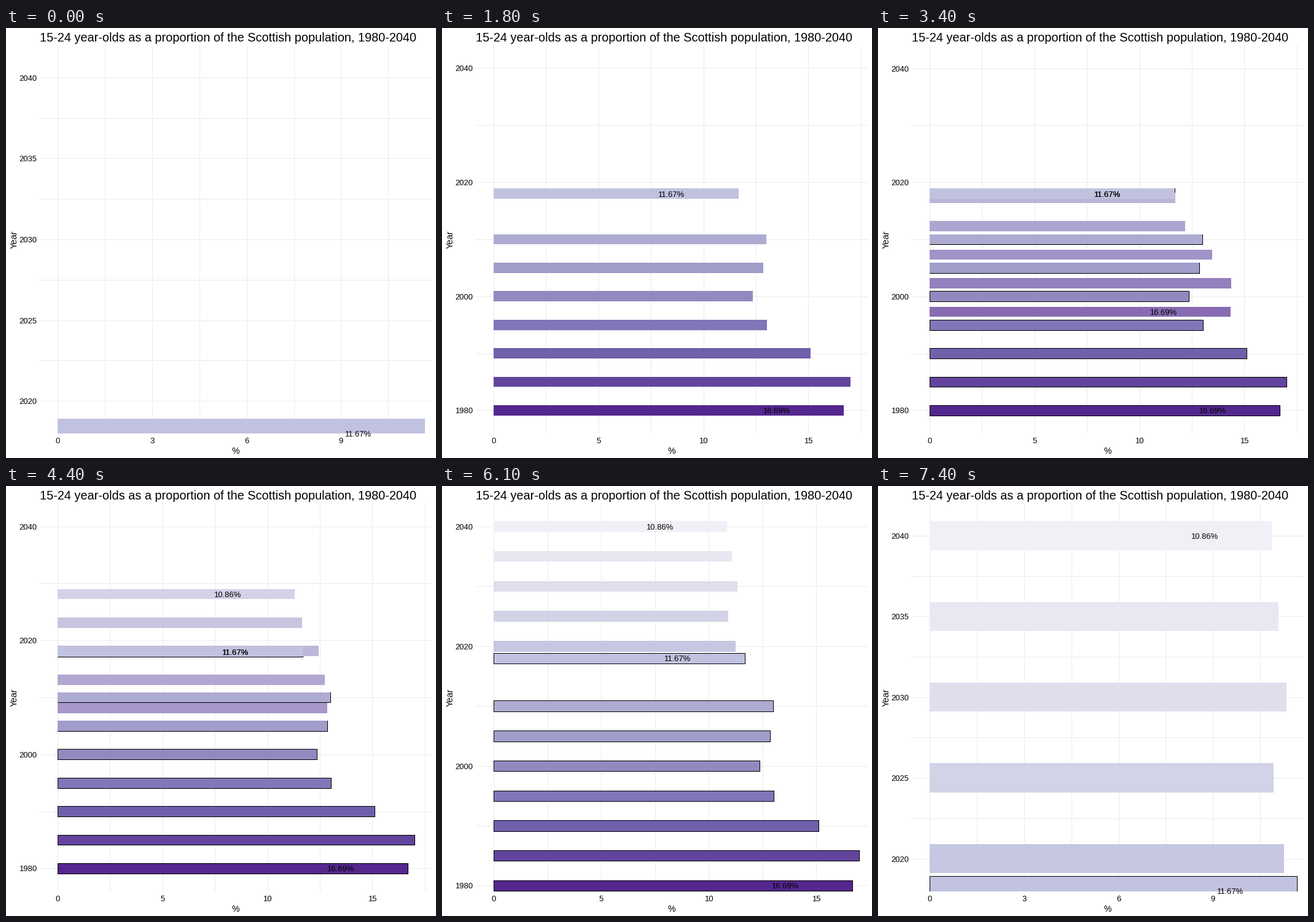
A matplotlib script that plays this animation: 700x700 px, repeating every 10 s.

```python
import math

import numpy as np
import matplotlib.pyplot as plt
from matplotlib.animation import FuncAnimation
from matplotlib.patches import Rectangle

plt.rcParams["font.family"] = "Liberation Sans"

SIZE, DPI = 700, 100
LEFT, RIGHT, TOP, BOTTOM = 55, 694, 28, 660
X_SPAN = (84.05, 664.95)      # pixels of the unexpanded x range
Y_SPAN = (630.8, 57.2)        # pixels of the unexpanded y range
PAD = 0.05
HALF = 0.9                    # half a bar, in years
LABEL_SHIFT = 110
GRID = "#EBEBEB"

FRAMES, LAST = 100, 74
MOVE_START, MOVE_END = 18, 55
ZOOM_START, ZOOM_LEN = 56, 19

PAST = [(1980, 16.69), (1985, 17.01), (1990, 15.11), (1995, 13.03),
        (2000, 12.36), (2005, 12.85), (2010, 13.0), (2018, 11.67)]
FUTURE = [(2020, 11.25), (2025, 10.92), (2030, 11.33), (2035, 11.08),
          (2040, 10.86)]
LABELS = {1980: "16.69%", 2018: "11.67%", 2040: "10.86%"}

# Views: x max, y min, y max
VIEW_PAST = np.array([17.01, 1979.1, 2018.9])
VIEW_ALL = np.array([17.01, 1979.1, 2040.9])
VIEW_FUTURE = np.array([11.33, 2019.1, 2040.9])

PURPLES = ["F2F0F7", "DADAEB", "BCBDDC", "9E9AC8", "756BB1", "54278F"]
TO_XYZ = np.array([[0.4124, 0.3576, 0.1805],
                   [0.2126, 0.7152, 0.0722],
                   [0.0193, 0.1192, 0.9505]])
WHITE = TO_XYZ.sum(axis=1)


def to_lab(code):
    rgb = np.array([int(code[i:i + 2], 16) for i in (0, 2, 4)]) / 255
    lin = np.where(rgb > 0.04045, ((rgb + 0.055) / 1.055) ** 2.4, rgb / 12.92)
    t = TO_XYZ @ lin / WHITE
    f = np.where(t > 0.008856, np.cbrt(t), 7.787 * t + 16 / 116)
    return np.array([116 * f[1] - 16, 500 * (f[0] - f[1]), 200 * (f[1] - f[2])])


def to_rgb(lab):
    fy = (lab[0] + 16) / 116
    f = np.array([fy + lab[1] / 500, fy, fy - lab[2] / 200])
    t = np.where(f > 0.2069, f ** 3, (f - 16 / 116) / 7.787)
    lin = np.clip(np.linalg.solve(TO_XYZ, t * WHITE), 0, 1)
    rgb = np.where(lin > 0.0031308, 1.055 * lin ** (1 / 2.4) - 0.055, 12.92 * lin)
    return tuple(np.clip(rgb, 0, 1))


STOPS = [to_lab(c) for c in PURPLES]


def year_lab(year):
    pos = (2040 - year) / 60 * (len(STOPS) - 1)
    i = min(int(pos), len(STOPS) - 2)
    return STOPS[i] + (STOPS[i + 1] - STOPS[i]) * (pos - i)


def ease(u):
    return 4 * u ** 3 if u < 0.5 else 1 - 4 * (1 - u) ** 3


def view_at(n):
    if n == 0:
        return VIEW_FUTURE
    if n < 19:
        return VIEW_PAST + (VIEW_ALL - VIEW_PAST) * ease((n - 1) / 18)
    if n <= ZOOM_START:
        return VIEW_ALL
    return VIEW_ALL + (VIEW_FUTURE - VIEW_ALL) * ease((n - ZOOM_START) / ZOOM_LEN)


def nice_ticks(lo, hi, want=5):
    """Best-scoring tick start, step and count (extended Wilkinson)."""
    span = hi - lo
    best, pick = -math.inf, None
    base = math.floor(math.log10(span))
    for power in (base - 1, base):
        for rank, q in enumerate((1, 5, 2, 2.5, 4, 3)):
            step = q * 10 ** power
            if not span / 12 < step < span:
                continue
            for first in range(math.floor(lo / step) - 1, math.ceil(hi / step)):
                for count in range(2, 11):
                    a, b = first * step, (first + count - 1) * step
                    simple = -rank / 5 + (a <= 0 <= b)
                    cover = 1 - 0.5 * ((hi - b) ** 2 + (lo - a) ** 2) / (0.1 * span) ** 2
                    ratio = (count - 1) / (b - a) * (max(b, hi) - min(a, lo)) / (want - 1)
                    dense = 2 - max(ratio, 1 / ratio)
                    score = 0.25 * simple + 0.2 * cover + 0.5 * dense
                    if score > best:
                        best, pick = score, (a, step, count)
    return pick


def breaks(lo, hi):
    extra = PAD * (hi - lo)
    lo, hi = lo - extra, hi + extra
    start, step, count = nice_ticks(lo, hi)
    major = [start + i * step for i in range(count)]
    minor = [start + (i - 0.5) * step for i in range(count + 1)]
    inside = lambda values: [v for v in values if lo <= v <= hi]
    return inside(major), inside(minor)


def tick_texts(values):
    whole = all(abs(v - round(v)) < 1e-6 for v in values)
    return [f"{v:.0f}" if whole else f"{v:.1f}" for v in values]


fig = plt.figure(figsize=(SIZE / DPI, SIZE / DPI), dpi=DPI, facecolor="white")
ax = fig.add_axes([0, 0, 1, 1])


def box(x0, y0, x1, y1, color, clip):
    r = Rectangle((x0, y0), x1 - x0, y1 - y0, facecolor=color, linewidth=0)
    ax.add_patch(r)
    r.set_clip_path(clip)


def write(x, y, text, px=13, **kw):
    kw.setdefault("ha", "center")
    return ax.text(x, y, text, fontsize=px * 72 / DPI, va="baseline",
                   color="black", **kw)


def draw(n):
    n = min(n, LAST)
    ax.clear()
    ax.set_xlim(0, SIZE)
    ax.set_ylim(SIZE, 0)
    ax.axis("off")
    clip = Rectangle((LEFT, TOP), RIGHT - LEFT, BOTTOM - TOP,
                     facecolor="none", linewidth=0)
    ax.add_patch(clip)

    x_max, y_min, y_max = view_at(n)

    def px(v):
        return X_SPAN[0] + v / x_max * (X_SPAN[1] - X_SPAN[0])

    def py(v):
        return Y_SPAN[0] + (v - y_min) / (y_max - y_min) * (Y_SPAN[1] - Y_SPAN[0])

    def bar(year, value, color, outline=False):
        x0, x1 = round(px(0)), round(px(value))
        y0, y1 = round(py(year + HALF)), round(py(year - HALF))
        if outline:
            box(x0, y0, x1 + 1, y1 + 1, "black", clip)
            box(x0 + 1, y0 + 1, x1, y1, color, clip)
        else:
            box(x0, y0, x1, y1, color, clip)

    def label(year, value, text):
        t = write(px(value) - LABEL_SHIFT, round(py(year)) + 5, text)
        t.set_clip_path(clip)

    # Grid and axis labels
    x_major, x_minor = breaks(0, x_max)
    y_major, y_minor = breaks(y_min, y_max)
    for v in x_major + x_minor:
        x = round(px(v))
        box(x, TOP, x + 1, BOTTOM, GRID, clip)
    for v in y_major + y_minor:
        y = round(py(v))
        box(LEFT, y, RIGHT, y + 1, GRID, clip)
    for v, s in zip(x_major, tick_texts(x_major)):
        write(px(v), 676, s)
    for v, s in zip(y_major, tick_texts(y_major)):
        write(50.5, round(py(v)) + 5, s, ha="right")

    # Bars: outlined past, then moving or future ones, then those still leaving
    moving = MOVE_START < n < MOVE_END
    marked = n > MOVE_START
    names = []
    for year, value in PAST:
        bar(year, value, to_rgb(year_lab(year)), marked)
        names.append((year, value, LABELS.get(year)))
    if marked:
        u = min((n - MOVE_START) / (MOVE_END - MOVE_START), 1)
        for (ya, va), (yb, vb) in zip(PAST, FUTURE):
            year, value = ya + (yb - ya) * u, va + (vb - va) * u
            la, lb = year_lab(ya), year_lab(yb)
            bar(year, value, to_rgb(la + (lb - la) * u))
            names.append((year, value, LABELS.get(ya if u < 0.5 else yb)))
    if moving:
        for year, value in PAST[len(FUTURE):]:
            bar(year, value, to_rgb(year_lab(year)))
            names.append((year, value, LABELS.get(year)))
    for year, value, text in names:
        if text and TOP - 20 < py(year) < BOTTOM + 20:
            label(year, value, text)

    write(55, 22, "15-24 year-olds as a proportion of the Scottish population, 1980-2040",
          px=19.9, ha="left")
    write(373.5, 693, "%", px=14)
    write(18, 344.5, "Year", px=14.6, rotation=90, rotation_mode="anchor")
    return []


anim = FuncAnimation(fig, draw, frames=FRAMES, interval=100,
                     init_func=lambda: [], repeat=True, repeat_delay=0, blit=False)
plt.show()
```
